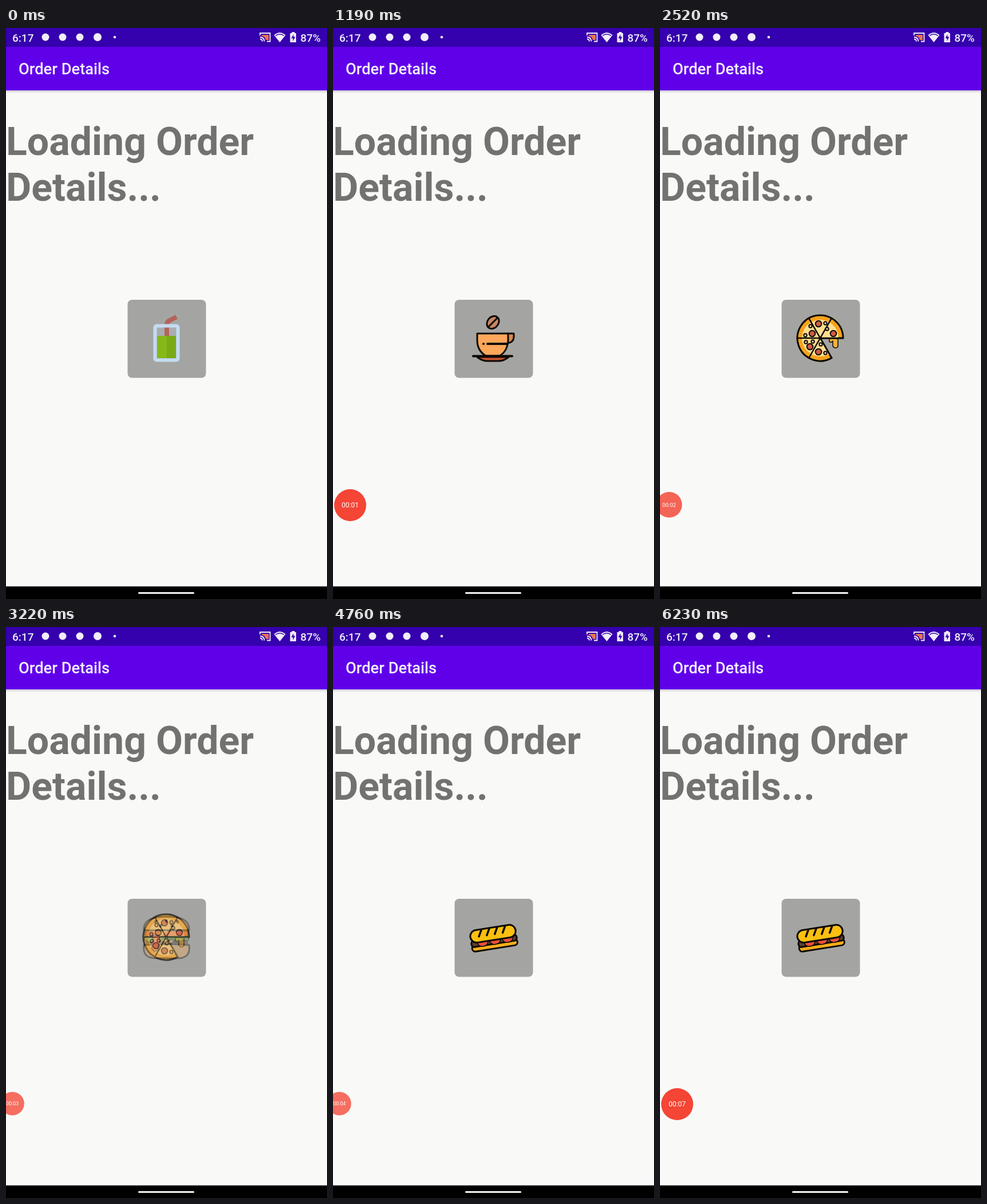
Animation of 561x998 px, one loop 6.37 s. Source, as an HTML page:

```html
<!DOCTYPE html>
<html lang="en">
<head>
<meta charset="utf-8">
<title>Order Details</title>
<style>
  html, body { margin: 0; width: 100%; height: 100%; overflow: hidden; background: #f9faf8; }
  svg { display: block; width: 561px; height: 998px; font-family: Roboto, sans-serif; }
  .icon { stroke: #0c0905; stroke-width: 3; stroke-linejoin: round; stroke-linecap: round; }
  .bare { stroke: none; }
  .line { fill: none; }
</style>
</head>
<body>
<svg viewBox="0 0 561 998">
  <defs>
    <linearGradient id="shade" x2="0" y2="1">
      <stop stop-color="#cfcbd6"/><stop offset="1" stop-color="#f9faf8"/>
    </linearGradient>
  </defs>
  <rect width="561" height="998" fill="#f9faf8"/>
  <rect y="109" width="561" height="5" fill="url(#shade)"/>
  <rect y="32" width="561" height="77" fill="#6000e9"/>
  <rect width="561" height="33" fill="#3500ad"/>
  <rect y="972" width="561" height="4" fill="#fff"/>
  <rect y="976" width="561" height="22"/>
  <rect x="231" y="986" width="98" height="3" rx="1.5" fill="#f4f4f4"/>

  <!-- status bar -->
  <g fill="#f2eefb" font-size="19" font-weight="500">
    <text x="11" y="23.5">6:17</text>
    <text x="550" y="23.5" text-anchor="end">87%</text>
    <circle cx="69" cy="16" r="6.5"/><circle cx="99" cy="16" r="6.5"/>
    <circle cx="129" cy="16" r="6.5"/><circle cx="160" cy="16" r="7"/>
    <circle cx="190" cy="16" r="2.3"/>
    <path d="M447 12h12v9h-5q-1-6-7-7z" fill="#e8734f"/>
    <path d="M444 13V9h17.500v14.500H456M444 16q7 0 7.500 7.500M444 19.500q4 0 4 4" fill="none" stroke="#f2eefb" stroke-width="1.800"/>
    <path d="M468.500 12.500Q478.500 3.500 488.500 12.500L478.500 25z"/>
    <path d="M471 13.500q7.500-5.500 15 0" fill="none" stroke="#3500ad" stroke-width="1.300"/>
    <path d="M499.500 9v-2h5v2h2.500v16h-10.500V9z"/>
    <path d="M502.500 11l-4 7h3v5l4-7.500h-3z" fill="#3500ad"/>
  </g>
  <text x="22" y="81" font-size="27.300" font-weight="500" fill="#f7f2ff">Order Details</text>
  <g font-size="68" font-weight="700" fill="#727370">
    <text x="0" y="222">Loading Order</text>
    <text x="0" y="302">Details...</text>
  </g>

  <rect x="212.500" y="475" width="137" height="136.500" rx="8" fill="#a4a5a2"/>

  <g class="icon" id="juice">
    <rect class="bare" x="263" y="523" width="35" height="56" fill="#a9adb0"/>
    <path class="line" d="M281 540V519Q281 513 286 511L298 505" stroke="#b5625a" stroke-width="8" stroke-linecap="butt"/>
    <path class="bare" d="M264 538h33v39h-33z" fill="#86b818"/>
    <path class="bare" d="M281 538h16v39h-16z" fill="#7aaa17"/>
    <rect class="line" x="260.500" y="520.500" width="40" height="60" rx="3" stroke="#c3dcf2" stroke-width="6"/>
  </g>

  <g class="icon" id="coffee" stroke-width="4">
    <ellipse cx="279.500" cy="514.500" rx="9.500" ry="12" transform="rotate(40 279.500 514.500)" fill="#c98560"/>
    <path class="line" d="M272 522L287 507"/>
    <path d="M305 534H316V541Q315 550 304 551" fill="#d98a4c"/>
    <path d="M252 534H306V546Q305 565 291 573H267Q252 564 252 546z" fill="#ffa75b"/>
    <path d="M252 575Q260 582 270 582H289Q299 582 307 575z" fill="#c9542f"/>
    <path class="line" d="M245 573.500H313M270 552H304M263 552h.1" style="stroke-width:4"/>
  </g>

  <g class="icon" id="pizza">
    <path d="M280 542H320A40 40 0 1 0 300 576.600z" fill="#f5a21b"/>
    <path class="bare" d="M280 542H312A32 32 0 1 0 296 569.700z" fill="#fddf90"/>
    <path class="line" d="M241 542H320M280 542L260 507M280 542L300 507M280 542L260 577M280 542L300 577" style="stroke-width:2.500"/>
    <path d="M296 543V548Q299 551 302 547V556Q306 562 311 557V543z" fill="#f8b13a" style="stroke-width:1.500"/>
    <g id="toppings" style="stroke-width:2"></g>
  </g>

  <g class="icon" id="burger">
    <path class="bare" d="M244 544h74v10h-74z" fill="#633b1c"/>
    <path d="M245 531H316Q321 537 316 541H245Q240 537 245 531z" fill="#f04a22" style="stroke-width:2"/>
    <path d="M243 541H318Q322 546 316 549Q311 545 306 549T294 549T282 549T270 549T258 549T246 549Q239 547 243 541z" fill="#6aa43a" style="stroke-width:1.500"/>
    <path d="M272 546L283 558L295 547L288 546L283 550L278 545z" fill="#ffb43c" style="stroke-width:1.500"/>
    <path d="M241 556Q281 552 320 556Q323 579 300 579H262Q238 579 241 556z" fill="#ffb04f"/>
    <path d="M256 531H283L269 541z" fill="#ffb43c" class="bare"/>
    <path d="M256 539H268V556Q266 559 266 564Q260 570 255 563V552Q258 548 256 539z" fill="#f04a22" style="stroke-width:1.500"/>
    <path d="M241 530Q239 506 281 506Q322 506 320 530z" fill="#ffb04f"/>
    <path class="line" d="M262 514l-1 2M280 513v2M299 514l1 2M271 521l-1 2M289 521l1 2" style="stroke-width:4.500"/>
  </g>

  <g class="icon" id="sandwich">
    <g transform="translate(280.500 542) rotate(-9)">
      <rect x="-40" y="9" width="80" height="11" rx="5.500" fill="#f6ad17"/>
      <rect x="-40" y="1" width="80" height="11" rx="5" fill="#5e4033"/>
      <path d="M-30 5h20q-2 8-10 8t-10-8zM-8 5h20q-2 8-10 8t-10-8zM14 5h20q-2 8-10 8t-10-8z" fill="#e94f3d" style="stroke-width:1.500"/>
      <rect x="-40" y="-17" width="80" height="22" rx="11" fill="#fdbf10"/>
      <path class="line" d="M-19-16l-6 11M-5-16l-6 11M9-16l-6 11M23-16l-6 11" style="stroke-width:3.500"/>
    </g>
  </g>

  <g id="bubble">
    <circle r="28" fill="#f44535"/>
    <text id="clock" y="4.200" font-size="12" text-anchor="middle" fill="#fff"></text>
  </g>
</svg>
<script>
const LOOP = 6370, FADE = 210;
const $ = id => document.getElementById(id);
const clamp = u => Math.min(1, Math.max(0, u));
const smooth = u => u * u * (3 - 2 * u);
const mix = (a, b, u) => a + (b - a) * u;

const icons = ['juice', 'coffee', 'pizza', 'burger', 'sandwich'];
const shows = [
  [0, 'juice'], [770, 'coffee'], [2100, 'pizza'], [3150, 'burger'],
  [4200, 'sandwich'], [4830, 'juice'], [5390, 'burger'], [5950, 'sandwich']
];
const seconds = [[0, 0], [980, 1], [2100, 2], [3150, 3], [4200, 4], [4900, 5], [5460, 6], [6090, 7]];
const current = (list, t) => list.findLastIndex(([start]) => t >= start);

function dots(points, r, fill) {
  return points.map(([x, y]) => `<circle cx="${x}" cy="${y}" r="${r}" fill="${fill}"/>`).join('');
}
$('toppings').innerHTML =
  dots([[277, 517], [266, 534], [303, 534], [262, 557], [277, 566]], 5.3, '#d05a45') +
  dots([[263, 521], [289, 516], [254, 537], [292, 526], [267, 548], [255, 549], [281, 553], [289, 568]], 2.7, '#f7d9a0');

function drawIcon(t) {
  const i = current(shows, t);
  const [start, name] = shows[i];
  const u = i ? clamp((t - start) / FADE) : 1;
  for (const id of icons) {
    $(id).style.opacity = id === name ? u : i && id === shows[i - 1][1] ? 1 - u : 0;
  }
}

function drawBubble(t) {
  // Slides in from the edge, then shrinks and docks there.
  const enter = clamp((t - (t < 5460 ? 70 : 5460)) / 350);
  const dock = t < 5460 ? smooth(clamp((t - 2100) / 630)) : 0;
  const x = mix(-35, 30, smooth(enter)) - 18.8 * dock;
  const scale = 1 - 0.265 * dock;
  $('bubble').setAttribute('transform', `translate(${x} ${834 - dock}) scale(${scale})`);
  $('bubble').style.opacity = clamp(enter * 1.25) * (1 - 0.23 * dock);
  $('clock').textContent = '00:0' + seconds[current(seconds, t)][1];
}

const began = performance.now();
function frame() {
  const t = (performance.now() - began) % LOOP;
  drawIcon(t);
  drawBubble(t);
  requestAnimationFrame(frame);
}
frame();
</script>
</body>
</html>
```
